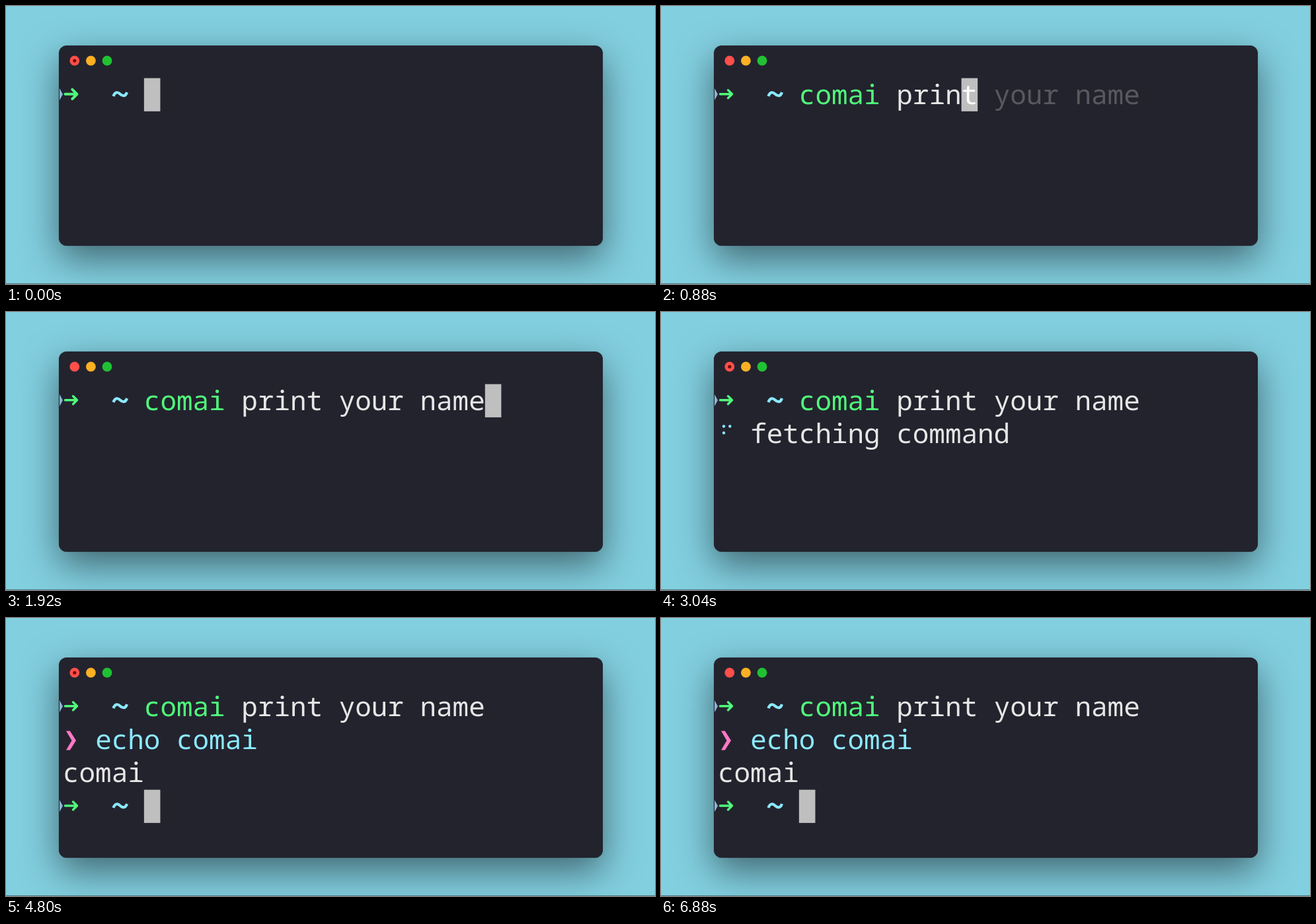
These frames come from a looping animation (982 by 422 pixels, 6.96 s). An HTML page with a canvas:

```html
<!DOCTYPE html>
<html lang="en">
<head>
<meta charset="utf-8">
<title>Terminal demo</title>
<style>
  html, body { margin: 0; width: 100%; height: 100%; overflow: hidden; }
  body { position: relative; box-sizing: border-box; background: #82cfe0; }
  .edge { position: absolute; left: 0; top: 421px; width: 982px; height: 1px; background: #4e7884; }
  .window {
    position: absolute; left: 80px; top: 60px; width: 823px; height: 303.5px;
    border-radius: 12px; background: #23232e;
    box-shadow: 0 0 1px rgba(0, 0, 0, .6), 0 20px 55px rgba(0, 0, 0, .5);
  }
  canvas { position: absolute; left: 0; top: 0; }
</style>
</head>
<body>
<div class="window"></div>
<div class="edge"></div>
<canvas width="982" height="422"></canvas>
<script>
const ctx = document.querySelector('canvas').getContext('2d');
const LOOP = 6960, STEP = 80;
const LEFT = 86, TOP = 109.5, CELL = 24.57, ROW = 50.4;
const GREEN = '#50fa7b', CYAN = '#8be9fd', PINK = '#ff79c6', TEXT = '#e6e6e6', GHOST = '#59595d';
const COMMAND = 'comai print your name';
const SPINNER = '⠋⠙⠹⠸⠼⠴⠦⠧⠇⠏';

// Moments of the story, in ms
const TYPE = 80, ENTER = 2240, ANSWER = 3680, OUTPUT = 4480;
const BUSY_OFF = 320, BUSY_ON = 2640, BUSY_END = 5280;

ctx.font = '40.95px "Noto Sans Mono", "DejaVu Sans Mono", monospace';
ctx.textRendering = 'geometricPrecision';
ctx.lineCap = ctx.lineJoin = 'round';

const colX = col => LEFT + col * CELL;

function text(str, col, row, color) {
  ctx.fillStyle = color;
  ctx.fillText(str, colX(col), TOP + 39 + row * ROW);
}

function circle(x, y, r, color) {
  ctx.fillStyle = color;
  ctx.beginPath();
  ctx.arc(x, y, r, 0, 2 * Math.PI);
  ctx.fill();
}

function shape(d, color, width) {
  const path = new Path2D(d);
  ctx.fillStyle = ctx.strokeStyle = color;
  ctx.lineWidth = width;
  width ? ctx.stroke(path) : ctx.fill(path);
}

function lights(busy) {
  circle(103.8, 83, 7.4, '#ff4f4a');
  circle(128.4, 83, 7.4, '#fdb024');
  circle(153, 83, 7.4, '#20c233');
  if (busy) circle(103.8, 83, 2.6, '#6d0b09');
}

function prompt(row, big) {
  ctx.save();
  ctx.translate(0, row * ROW);
  shape('M81 125L86 134L81 143Z', '#86b5d8');
  const h = big ? 7.2 : 6;
  shape(`M89.5 133.8H107M${107.5 - h} ${133.8 - h}L107.5 133.8L${107.5 - h} ${133.8 + h}`, GREEN, big ? 4 : 3.4);
  ctx.lineCap = 'butt';
  shape('M162.5 137C165 129.5 169.5 130.5 172.5 133.5S180.5 138.5 183 131', CYAN, 4.2);
  ctx.restore();
}

function cursor(col, row) {
  ctx.fillStyle = '#bfbfbf';
  ctx.fillRect(colX(col), TOP + row * ROW, CELL, ROW);
}

function commandLine(count, active) {
  if (active) cursor(5 + count, 0);
  if (!count) return;
  text(COMMAND.slice(0, Math.min(count, 5)), 5, 0, GREEN);
  if (count > 6) text(COMMAND.slice(6, count), 11, 0, TEXT);
  if (count < COMMAND.length) {
    text(COMMAND[count], 5 + count, 0, '#fff');
    text(COMMAND.slice(count + 1), 6 + count, 0, GHOST);
  }
}

// Braille bits 0-2 are the left column, 3-5 the right one
function spinner(step) {
  const bits = SPINNER.charCodeAt(step % SPINNER.length) - 0x2800;
  for (let i = 0; i < 6; i++) {
    if (bits >> i & 1) circle(i < 3 ? 95 : 104.3, 173.5 + i % 3 * 10, 2.2, CYAN);
  }
}

function draw(t) {
  ctx.clearRect(0, 0, 982, 422);
  lights(t < BUSY_OFF || t >= BUSY_ON && t < BUSY_END);
  const count = Math.max(0, Math.min(COMMAND.length, Math.floor((t - TYPE) / STEP)));
  prompt(0, count === 0);
  commandLine(count, t < ENTER);

  if (t >= ENTER && t < ANSWER) {
    spinner(Math.floor((t - ENTER) / STEP));
    text('fetching command', 2, 1, TEXT);
  }
  if (t >= ANSWER) {
    shape('M91 171.5H96.8L106 186L96.8 200.5H91L99.5 186Z', PINK);
    text('echo comai', 2, 1, CYAN);
  }
  if (t >= OUTPUT) {
    text('comai', 0, 2, TEXT);
    prompt(3);
    cursor(5, 3);
  }
}

const start = performance.now();
function tick() {
  draw((performance.now() - start) % LOOP);
  requestAnimationFrame(tick);
}
tick();
</script>
</body>
</html>
```
